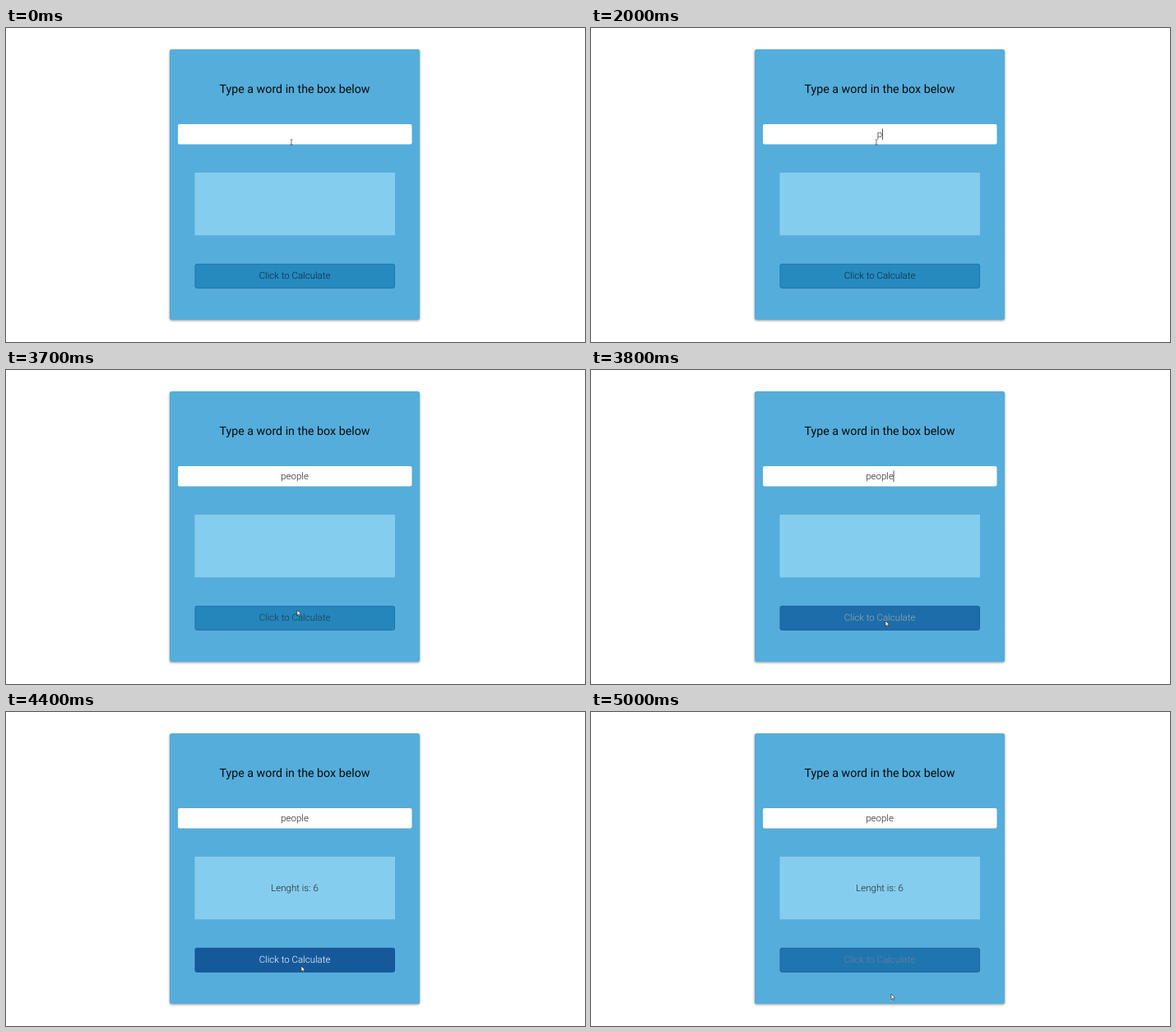
These frames come from a looping animation (704x382 px, 5.1 s). An HTML page:

```html
<!DOCTYPE html>
<html lang="en">
<head>
<meta charset="utf-8">
<title>Word length</title>
<style>
  html, body { margin: 0; width: 100%; height: 100%; overflow: hidden; background: #fff; }
  svg { display: block; width: 704px; height: 382px; }
  text { font: 300 11.5px Roboto, sans-serif; text-anchor: middle; text-rendering: geometricPrecision; fill: #222; }
  #title { font-size: 14.25px; font-weight: 400; fill: #0a0a0a; }
  #card { fill: #55addb; filter: drop-shadow(0 1.5px 1.5px rgba(0, 0, 0, .42)); }
</style>
</head>
<body>
<svg viewBox="0 0 704 382">
  <rect width="704" height="1" fill="#fbfbfb"/>
  <rect id="card" x="199" y="26" width="304" height="329" rx="2.5"/>
  <text id="title" x="351" y="79">Type a word in the box below</text>

  <rect x="209" y="117" width="284.5" height="24.5" rx="2" fill="#fff"/>
  <text id="word" x="351" y="133"></text>
  <rect id="caret" y="122.5" width="0.8" height="13.5" fill="#222"/>

  <rect x="229.5" y="176" width="243.5" height="76.3" fill="#85cdee"/>
  <text id="result" x="351" y="218.3">Lenght is: 6</text>

  <rect id="button" x="230" y="287.3" width="242.5" height="29" rx="2"/>
  <text id="label" x="351" y="305.4">Click to Calculate</text>

  <path id="beam" d="M345.5 135.8h1l.5.5.5-.5h1M347 136.3v5.4M345.5 142.2h1l.5-.5.5.5h1" fill="none" stroke="#333" stroke-width=".7"/>
  <path id="arrow" d="M0 0V6.6L1.5 5.3 2.5 7.6 3.6 7.1 2.6 4.9H4.7Z" fill="#fff" stroke="#222" stroke-width=".6"/>
</svg>
<script>
const LOOP = 5100, STEP = 100;
const $ = id => document.getElementById(id);
const show = (id, on) => $(id).setAttribute('visibility', on ? 'visible' : 'hidden');

const keyTimes = [2000, 2200, 2300, 2500, 2600, 2800];
const caretSpans = [[700, 1200], [1700, 3300], [3800, 4300]];

// [time, x, y] of the arrow tip
const path = [
  [3500, 352, 215], [3600, 353, 262], [3700, 354, 292], [3800, 358, 305],
  [3900, 359, 309], [4700, 359, 309], [4800, 357, 319], [4900, 354, 335], [5000, 365, 343]
];
// [time, amount] of the button's hover state
const hover = [[3600, 0], [3700, .08], [3800, .6], [3900, 1], [4800, 1], [4900, .88], [5000, .42]];

// Linear interpolation between keyed rows
function sample(rows, t) {
  if (t <= rows[0][0]) return rows[0].slice(1);
  const i = rows.findIndex(row => row[0] >= t);
  if (i < 0) return rows[rows.length - 1].slice(1);
  const [a, b] = [rows[i - 1], rows[i]];
  const k = (t - a[0]) / (b[0] - a[0]);
  return a.slice(1).map((v, j) => v + (b[j + 1] - v) * k);
}

function mix(from, to, k) {
  return `rgb(${from.map((v, i) => Math.round(v + (to[i] - v) * k))})`;
}

function draw(t) {
  const word = $('word');
  word.textContent = 'people'.slice(0, keyTimes.filter(k => k <= t).length);
  const width = word.textContent ? word.getComputedTextLength() : 0;
  $('caret').setAttribute('x', 350.8 + width / 2);
  show('caret', caretSpans.some(([on, off]) => t >= on && t < off));

  const [k] = sample(hover, t);
  $('button').style.fill = mix([38, 138, 191], [22, 89, 154], k);
  $('button').style.stroke = mix([31, 116, 168], [20, 82, 144], k);
  $('label').style.fill = mix([14, 38, 58], [255, 255, 255], k);

  show('result', t >= 4400);
  show('beam', t < 3500);
  show('arrow', t >= 3500);
  $('arrow').setAttribute('transform', `translate(${sample(path, t)})`);
}

const start = performance.now();
function tick() {
  const t = (performance.now() - start) % LOOP;
  draw(Math.floor(t / STEP) * STEP);
  requestAnimationFrame(tick);
}
tick();
</script>
</body>
</html>
```
